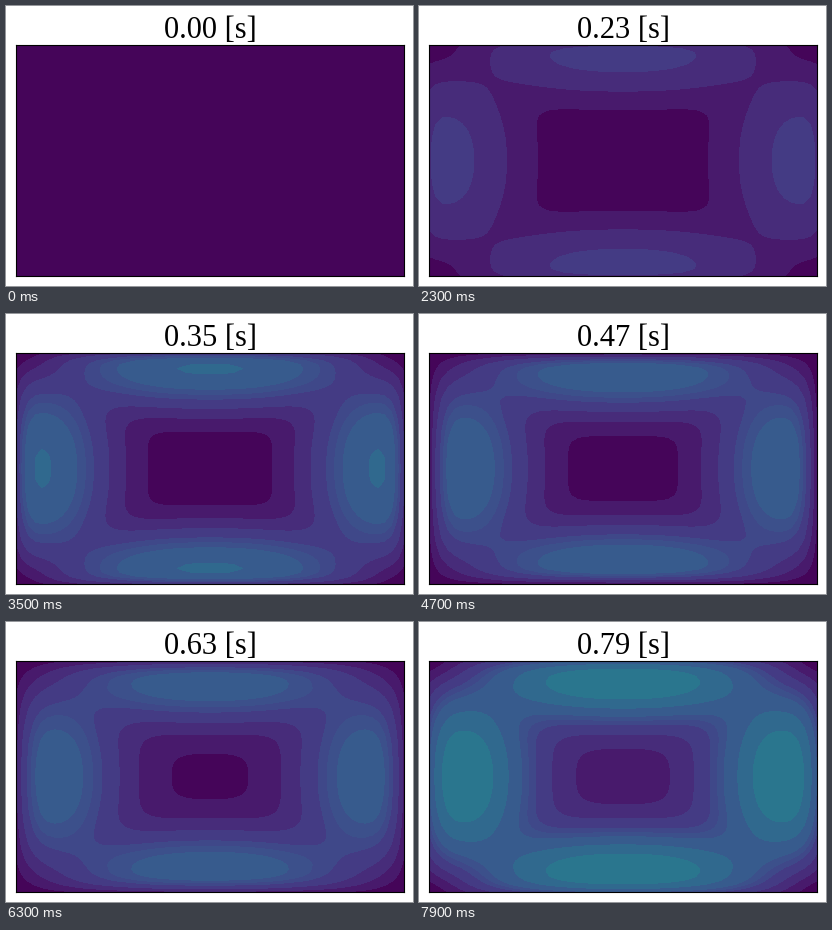
Recreate the animation shown at these times as a matplotlib script. Size 407 by 280 pixels, loop 8000 ms.

```python
import numpy as np
import matplotlib.pyplot as plt
from matplotlib.animation import FuncAnimation

W, H, DPI = 407, 280, 100
FRAMES, INTERVAL = 80, 100
LEVELS = [0, 1, 2, 3, 4, 4.5, 5, 6, 7, 8, 9]

plt.rcParams["font.family"] = "Liberation Serif"

# Key points over time for the ridge that runs along the walls
T = [0, .18, .23, .35, .47, .57, .69, .79]
PEAK = [0, .95, 3.35, 6.1, 5.85, 5.3, 6.05, 7.9]
PLACE = [.95, .93, .91, .87, .82, .78, .82, .82]
WALL = [0, .9, 2.9, 3, 1, .9, 2.5, 4.9]

grid = np.linspace(-1, 1, 61)
dist = np.abs(grid)
fade = 1 - dist ** 2.3
Q = 2.5  # how sharply the two directions blend


def profile(core, peak, place, wall):
    """Speed along a mid-line: eased rise to the peak, then a fall to the wall."""
    rise = np.minimum(dist / place, 1) ** 1.4
    fall = np.maximum(dist - place, 0) / (1 - place)
    inner = core + (peak - core) * np.sin(np.pi / 2 * rise) ** 2
    return inner - (peak - wall) * fall ** 2.5


def field(t):
    core = 3 * t ** 3
    speed = profile(core, *(np.interp(t, T, k) for k in (PEAK, PLACE, WALL)))
    ridge = np.maximum(speed, 0) ** Q - core ** Q * fade
    side = np.outer(fade ** Q, np.maximum(ridge, 0))
    return (side + side.T + core ** Q * np.outer(fade, fade)) ** (1 / Q)


fig = plt.figure(figsize=(W / 100, H / 100), dpi=DPI, facecolor="white")
ax = fig.add_axes([10 / W, 10 / H, 388 / W, 231 / H])


def draw(n):
    t = n / 100
    ax.clear()
    ax.contourf(grid, grid, field(t), levels=LEVELS, cmap="viridis",
                vmin=.28, vmax=18.6)
    ax.set(xticks=[], yticks=[], xlim=(-1, 1), ylim=(-1, 1))
    ax.set_title(f"{t:.2f} [s]", fontsize=22, pad=5)
    return []


anim = FuncAnimation(fig, draw, frames=FRAMES, interval=INTERVAL,
                     repeat=True, repeat_delay=0)
plt.show()
```
